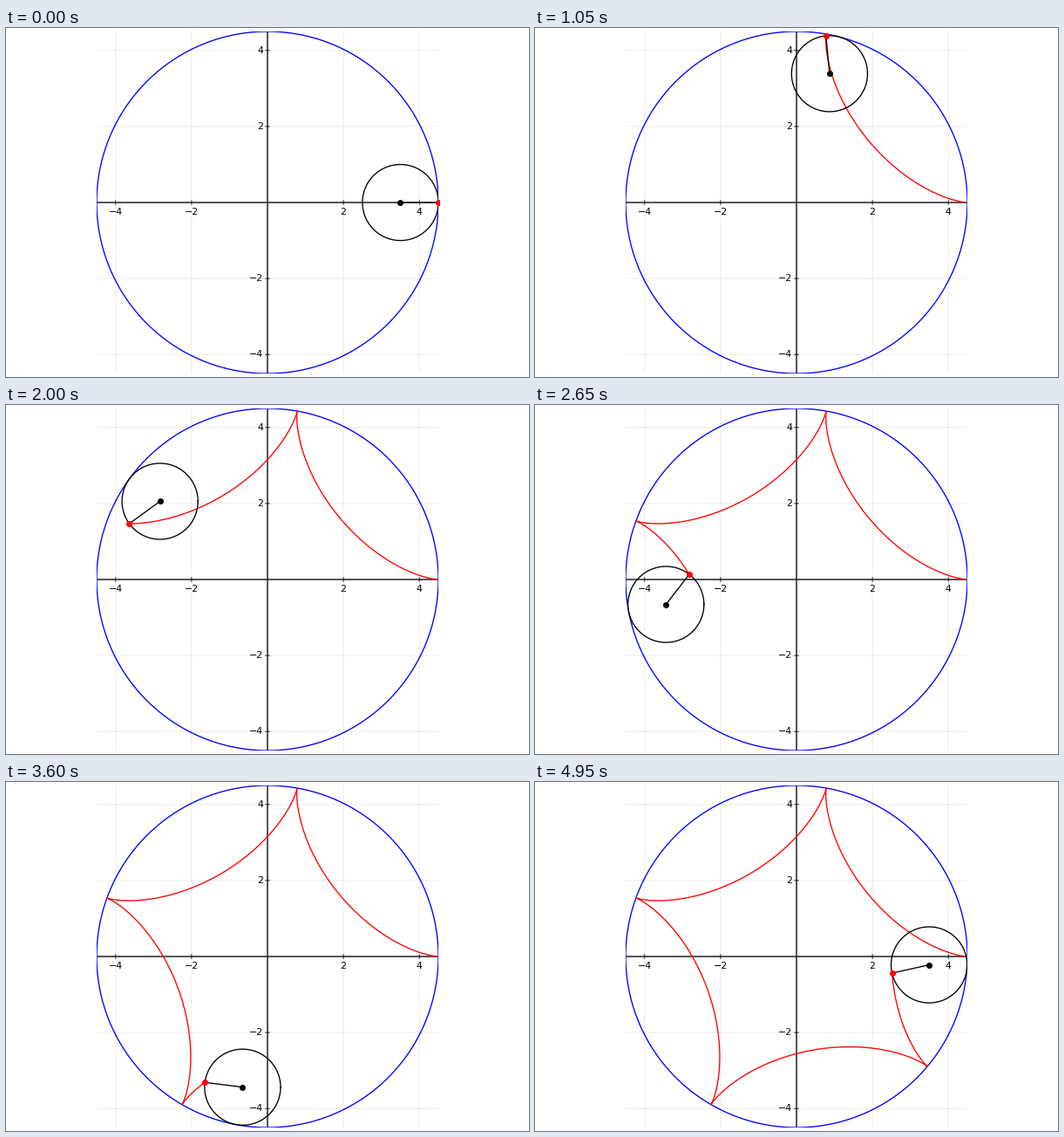
These frames come from a looping animation (600x400 px, 5 s). A matplotlib script:

```python
import numpy as np
import matplotlib.pyplot as plt
from matplotlib.animation import FuncAnimation
from matplotlib.patches import Rectangle

W, H, DPI = 600, 400, 100
R, r = 4.5, 1.0
SCALE = 392 / (2 * R)      # pixels per unit
STEPS = 100
PT = 72 / DPI              # points per pixel

plt.rcParams["font.family"] = "DejaVu Sans"
plt.rcParams["path.simplify"] = False

fig = plt.figure(figsize=(W / DPI, H / DPI), dpi=DPI, facecolor="white")
ax = fig.add_axes([0, 0, 1, 1])
ax.set_xlim(-W / 2 / SCALE, W / 2 / SCALE)
ax.set_ylim(-H / 2 / SCALE, H / 2 / SCALE)
ax.axis("off")


def clip_box(extra=0):
    return Rectangle((-R, -R), 2 * R + extra / SCALE, 2 * R,
                     transform=ax.transData)


line_clip, dot_clip = clip_box(), clip_box(1)


def line(x, y, color="black", width=1.33, **style):
    artist, = ax.plot(x, y, color=color, lw=width * PT, snap=False, **style)
    artist.set_clip_path(line_clip)
    return artist


def dot(color):
    artist, = ax.plot([], [], "o", color=color, ms=7 * PT, mew=0, snap=False)
    artist.set_clip_path(dot_clip)
    return artist


def label(x, y, value, ha):
    text = str(value).replace("-", "\u2212")
    ax.text(x, y, text, size=11 * PT, ha=ha, va="center")


def center(t):
    return (R - r) * np.cos(t), (R - r) * np.sin(t)


def pen(t):
    x, y = center(t)
    spin = (R - r) / r * t
    return x + r * np.cos(spin), y - r * np.sin(spin)


# grid, axes and ticks
TICKS = (-4, -2, 2, 4)
for v in TICKS:
    line([v, v], [-R, R], width=1, alpha=0.08)
    line([-R, R], [v, v], width=1, alpha=0.08)
line([-R, R], [0, 0])
line([0, 0], [-R, R])
tick = 2.4 / SCALE
for v in TICKS:
    line([v, v], [-tick, tick], width=0.8)
    line([-tick, tick], [v, v], width=0.8)
    label(v, -11 / SCALE, v, "center")
    label(-4.7 / SCALE, v, v, "right")

turn = np.linspace(0, 2 * np.pi, 361)
cos_t, sin_t = np.cos(turn), np.sin(turn)

line(R * cos_t, R * sin_t, "blue")
trace = line([], [], "red")
wheel = line([], [])
spoke = line([], [])
hub = dot("black")
tip = dot("red")


def update(k):
    t = 2 * np.pi * k / STEPS
    cx, cy = center(t)
    px, py = pen(t)
    trace.set_data(*pen(np.linspace(0, t, 8 * k + 1)))
    wheel.set_data(cx + r * cos_t, cy + r * sin_t)
    spoke.set_data([cx, px], [cy, py])
    hub.set_data([cx], [cy])
    tip.set_data([px], [py])
    return trace, wheel, spoke, hub, tip


anim = FuncAnimation(fig, update, frames=STEPS, interval=50,
                     repeat=True, repeat_delay=0)
plt.show()
```
